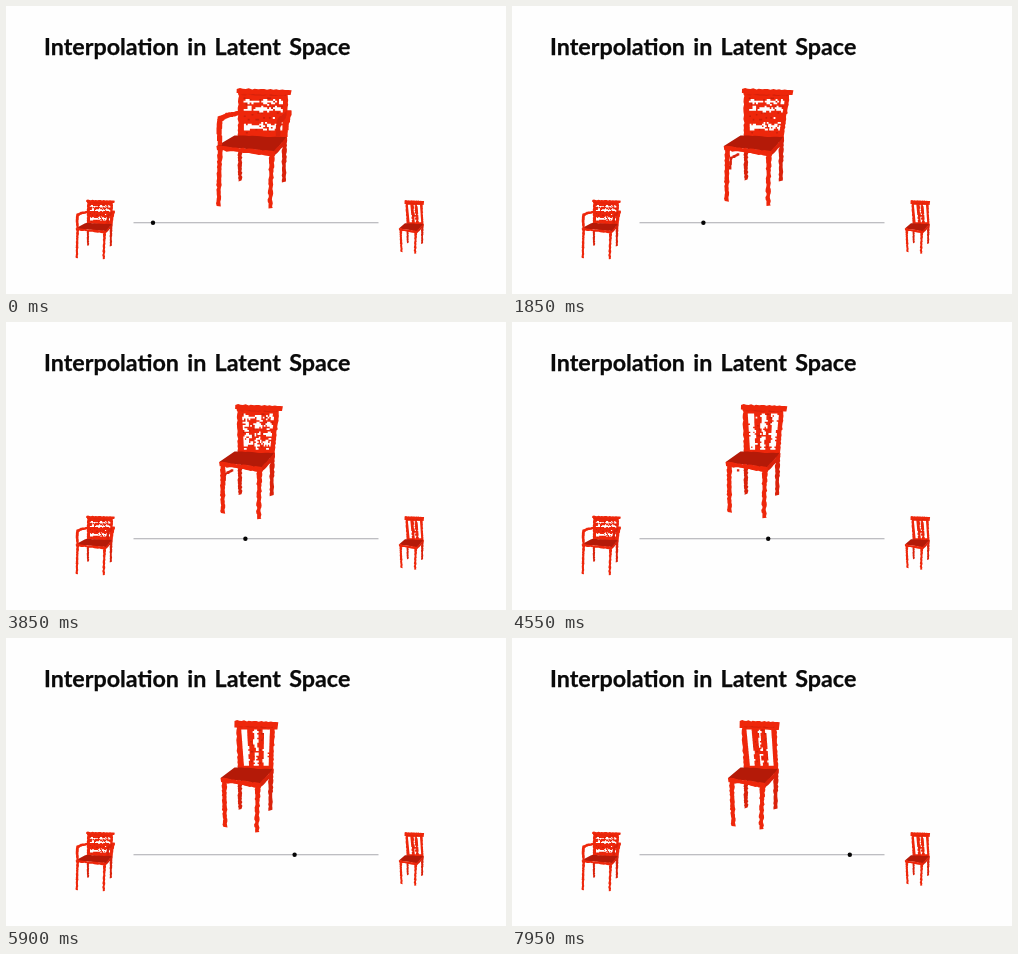
An HTML page that plays this animation: 500x288 px, repeating every 8 s.

```html
<!DOCTYPE html>
<html lang="en">
<head>
<meta charset="utf-8">
<title>Interpolation in Latent Space</title>
<style>
  html, body { margin: 0; width: 100%; height: 100%; overflow: hidden; background: #fefefe; }
  svg { display: block; width: 100vw; height: 100vh; }
  text { font: 700 23.3px Lato, "Open Sans", sans-serif; word-spacing: 2.6px; fill: #0a0a0a; stroke: #0a0a0a; stroke-width: .25px; }
</style>
</head>
<body>
<svg viewBox="0 0 500 288">
  <rect width="500" height="288" fill="#fefefe"/>
  <text x="38" y="49.4">Interpolation in Latent Space</text>
  <path d="M127.5 216.8H372.5" stroke="#a9a9ae" stroke-width="1.1"/>
  <circle id="dot" cy="216.8" r="2.2" fill="#050505"/>
  <g id="main"></g>
  <g id="from" transform="translate(-39.7 153) scale(.52 .495)"></g>
  <g id="to" transform="translate(287 153.8) scale(.49)"></g>
</svg>
<script>
const LOOP = 8000, STEP = 50;
const RED = '#ee270b', SIDE = '#da220b', DARK = '#b41a08', PAPER = '#fefefe';
const $ = id => document.getElementById(id);

const lerp = (a, b, k) => a + (b - a) * k;
const clamp = x => Math.max(0, Math.min(1, x));
const ramp = (x, a, b) => { const k = clamp((x - a) / (b - a)); return k * k * (3 - 2 * k); };
const noise = i => { const s = Math.sin(i * 12.9898 + 4.1) * 43758.5453; return s - Math.floor(s); };
const bump = (x, c, w) => Math.max(0, 1 - Math.abs(x - c) / w);

// The seat narrows quickly at first; everything else drifts steadily.
function poseAt(t) {
  const k = t / LOOP, settle = 1 - Math.exp(-t / 1400);
  return {
    topL: 231 - 3 * k,
    topR: 285 - 18 * k,
    backR: 281 - 11.5 * settle - 3 * k,
    frontL: 211 + 5.5 * k,
    frontR: 269 - 11 * settle - 4.5 * k,
    footL: [212.5 + 9 * k, 200 - 12 * k * (2 - k)],
    footR: [264 - 9 * settle - 6 * k, 202 - 11 * k],
    backFootY: 176 - 5 * k
  };
}

// Collects filled shapes whose long edges are ragged like a point cloud.
function sketch() {
  let out = '', seed = 0;
  const add = (d, fill) => { out += `<path d="${d}" fill="${fill}"/>`; };
  const edge = (x0, y0, x1, y1, n, rough) => {
    const pts = [];
    for (let i = 0; i <= n; i++) {
      const k = i / n, r = () => (noise(seed++) - .5) * rough;
      pts.push((lerp(x0, x1, k) + r()).toFixed(1) + ' ' + (lerp(y0, y1, k) + r()).toFixed(1));
    }
    return pts;
  };
  const quad = (a, b, c, d, fill, n = 16, rough = 1.2) =>
    add('M' + [...edge(...a, ...b, n, rough), ...edge(...c, ...d, n, rough)].join('L') + 'Z', fill);
  const post = (x0, y0, x1, y1, w, fill, n = 20) =>
    quad([x0 - w / 2, y0], [x1 - w * .42, y1], [x1 + w * .42, y1], [x0 + w / 2, y0], fill, n);
  const rail = (x0, y0, x1, y1, h, fill, n = 18) =>
    quad([x0, y0], [x1, y1], [x1, y1 + h], [x0, y0 + h], fill, n);
  const box = (x, y, w, h) => `M${x.toFixed(1)} ${y.toFixed(1)}h${w.toFixed(1)}v${h.toFixed(1)}h${(-w).toFixed(1)}z`;
  const crumbs = (pts, size, keep, fill) => {
    let d = '';
    for (let j = 0; j < pts.length - 1; j++) {
      for (let i = 0; i < 9; i++) {
        const k = i / 9, s = size * (.8 + .4 * noise(seed++)), live = noise(seed++) < keep;
        if (live) d += box(lerp(pts[j][0], pts[j + 1][0], k) - s / 2, lerp(pts[j][1], pts[j + 1][1], k) - s / 2, s, s);
      }
    }
    if (d) add(d, fill);
  };
  return { add, quad, post, rail, box, crumbs, html: () => out };
}

// Openings in the back turn from horizontal gaps into three upright slots.
function backHoles(s, p, t) {
  const cols = 20, rows = 22, toSlots = ramp(t, 3000, 5200), tidy = ramp(t, 4800, 7000);
  let open = '', shade = '';
  for (let r = 0; r < rows; r++) {
    const v = r / rows, y = 91.5 + v * 36;
    const left = lerp(p.topL + 6.5, 238, v), right = lerp(p.topR - 8, p.backR - 5, v), w = (right - left) / cols;
    for (let c = 0; c < cols; c++) {
      const u = (c + .5) / cols, id = r * 31 + c;
      const n = .5 * noise(900 + r * 17 + (c >> 1)) + .5 * noise(2000 + id);
      const gaps = .65 * Math.max(bump(v, .1, .1), bump(v, .3, .12), bump(v, .78, .14),
        ramp(t, 1500, 3400) * bump(v, .58, .1));
      const middle = bump(u, .5, .3) * .3 * (1 + tidy);
      const slots = .5 + .5 * Math.cos(5 * Math.PI * (u - .1)) - middle;
      if (lerp(gaps, slots, toSlots) + (n - .5) * lerp(.9, .6, tidy) > .42)
        open += s.box(left + c * w, y, w + .15, 1.75);
      else if (noise(5000 + id) > .88)
        shade += s.box(left + c * w, y, w, 1.6);
    }
  }
  s.add(shade, '#c9200b');
  s.add(open, PAPER);
}

function chair(t) {
  const p = poseAt(t), s = sketch(), arms = 1 - ramp(t, 250, 1600);
  const strut = .75 * ramp(t, 700, 1800) * (1 - ramp(t, 3400, 5000));

  s.post(234, 144, 234, p.backFootY - 1, 4.2, SIDE);
  s.post(p.backR - 2.5, 130, p.backR - 3, p.backFootY, 4.6, SIDE);

  s.quad([p.topL + 1.5, 86], [232, 131], [p.backR, 132], [p.topR - 3, 86], RED, 22);
  backHoles(s, p, t);
  s.rail(p.topL, 82.5, p.topR, 84, lerp(5, 8, ramp(t, 4000, 6600)), RED);
  s.rail(p.topL + 3, 88, p.topR - 5, 89.2, .8, '#d4220b');

  s.quad([228, 129.5], [p.backR - 1, 131], [p.frontR, 146], [p.frontL, 140], DARK, 14, 1);
  s.quad([p.frontR - 1, 145], [p.backR, 131], [p.backR, 136], [p.frontR - 1, 151], SIDE, 8, 1);
  s.rail(p.frontL, 139.5, p.frontR, 145.5, 4.6, RED);

  s.crumbs([[218, 162], [219, 152], [227, 148]], 2.5, strut, SIDE);
  s.post(p.frontL + 3, 140, ...p.footL, 5, RED, 26);
  s.post(p.frontR - 3, 146, ...p.footR, 5, RED, 26);

  s.crumbs([[234, 107], [222, 109], [214, 113], [213, 124], [214, 139]], 4.5, arms, RED);
  s.crumbs([[283, 107], [274, 114], [272, 121], [272, 129]], 4, arms, SIDE);
  s.crumbs([[283, 107], [281, 118], [279, 130]], 4, arms, RED);
  return s.html();
}

function draw(t) {
  $('dot').setAttribute('cx', 147 + .024 * t);
  $('main').innerHTML = chair(t);
}

$('from').innerHTML = chair(0);
$('to').innerHTML = chair(LOOP);

const start = performance.now();
let shown = -1;
function tick() {
  const t = Math.floor((performance.now() - start) % LOOP / STEP) * STEP;
  if (t !== shown) draw(shown = t);
  requestAnimationFrame(tick);
}
tick();
</script>
</body>
</html>
```
